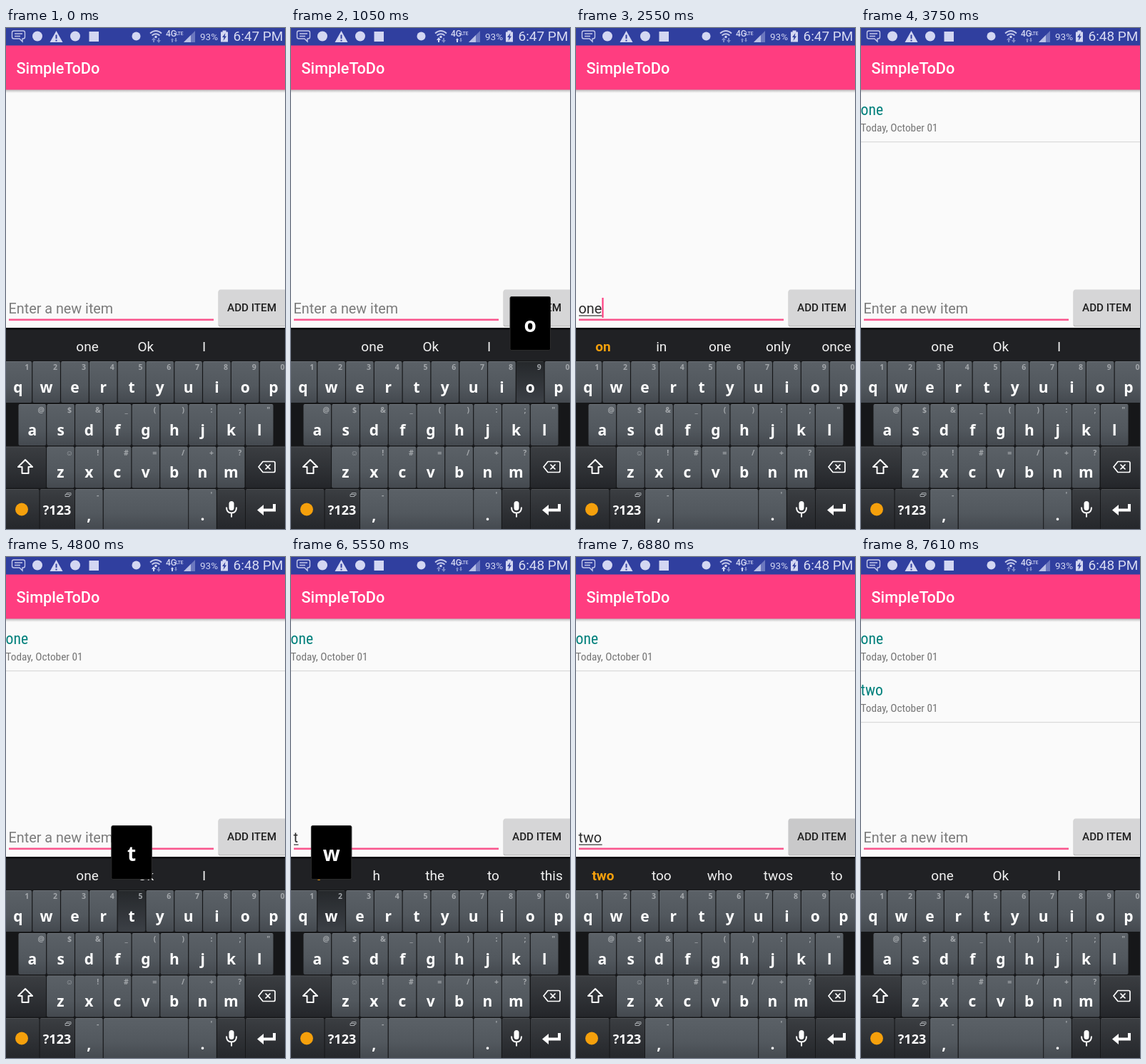
Animation of 391x702 px, one loop 8000 ms. Source, as an HTML page:

```html
<!DOCTYPE html>
<html lang="en">
<head>
<meta charset="utf-8">
<title>To-do list</title>
<style>
  html, body { margin: 0; width: 100%; height: 100%; overflow: hidden; background: #fafafa; }
  svg { display: block; width: 100%; height: 100%; font-family: Roboto, sans-serif; }
  .key { font: 700 21px "Noto Sans", sans-serif; fill: #fff; text-anchor: middle; }
  .tip { font: 700 10.5px "Noto Sans", sans-serif; fill: #a3a7ab; text-anchor: middle; }
  .word { font-size: 19px; fill: #f2f2f2; text-anchor: middle; }
  .word.top { font-weight: 700; fill: #f5a00c; }
  .condensed { font-family: "Roboto Condensed", Roboto, sans-serif; font-stretch: 75%; }
</style>
</head>
<body>
<svg id="stage" viewBox="0 0 391 702" preserveAspectRatio="none">
  <defs>
    <linearGradient id="light" x2="0" y2="1">
      <stop offset="0" stop-color="#5b6167"/><stop offset=".6" stop-color="#52585e"/><stop offset="1" stop-color="#44494f"/>
    </linearGradient>
    <linearGradient id="dark" x2="0" y2="1">
      <stop offset="0" stop-color="#3b3e42"/><stop offset="1" stop-color="#24262a"/>
    </linearGradient>
    <linearGradient id="down" x2="0" y2="1">
      <stop offset="0" stop-color="#25282b"/><stop offset="1" stop-color="#3c4046"/>
    </linearGradient>
    <linearGradient id="shade" x2="0" y2="1">
      <stop offset="0" stop-color="#b5b5b5"/><stop offset="1" stop-color="#fafafa"/>
    </linearGradient>
  </defs>
  <rect width="391" height="702" fill="#fafafa"/>
  <rect y="86" width="391" height="5" fill="url(#shade)"/>
  <rect y="24" width="391" height="62.5" fill="#ff3d80"/>
  <text x="14.5" y="64" font-size="21.7" font-weight="500" fill="#fff">SimpleToDo</text>

  <g id="status">
    <rect width="391" height="24.5" fill="#303f9f"/>
    <g fill="none" stroke="#c3c8ea" stroke-width="1.4">
      <path d="M11 4h13q2.500 0 2.500 2.500v6q0 2.500-2.500 2.500h-1v4l-4-4h-8q-2.500 0-2.500-2.500v-6q0-2.500 2.500-2.500zM12 8h11M12 11.500h8"/>
      <path d="M202 7.500q8-7 16 0M204.500 10.500q5.500-4.500 11 0" stroke-width="1.8"/>
    </g>
    <g fill="#d3d7f2">
      <circle cx="44" cy="11.500" r="7"/>
      <path fill-rule="evenodd" d="M70.500 4l9 16h-18zM69.500 9.500v5.500h2v-5.500zM69.500 16.500v2h2v-2z"/>
      <circle cx="97" cy="11.500" r="7"/>
      <rect x="116.500" y="5" width="13.500" height="14"/>
      <circle cx="182.500" cy="11.500" r="6"/>
      <circle cx="210" cy="12.500" r="1.700"/>
      <text x="224" y="12" font-size="12" font-weight="500">4G</text>
      <text x="238" y="9.500" font-size="6.500" font-weight="500">LTE</text>
      <text x="272" y="17" font-size="13.500">93%</text>
      <path fill-rule="evenodd" d="M303.500 3.500h5v2h2.500v14h-10v-14h2.500zM307.500 7l-4.500 6h2.500l-1 5 4.500-6.500h-2.500z"/>
    </g>
    <path d="M206 20v-3h-2l3-4 3 4h-2v3zM232 20v-3h-1l2-3 2 3h-1v3z" fill="#7d88c8" id="upload"/>
    <path d="M213 14v3h-2l3 4 3-4h-2v-3zM237 14v3h-1l2 3 2-3h-1v-3z" fill="#7d88c8"/>
    <path d="M249 20L265 4v16z" fill="#6c78bf"/>
    <path d="M249 20l10-10v10z" fill="#b9c0e6"/>
    <text id="clock" x="318.500" y="18" font-size="19" fill="#d8dbf2"></text>
  </g>

  <g id="list"></g>

  <text id="hint" x="3.500" y="400" font-size="19.800" fill="#7b7b7b">Enter a new item</text>
  <text id="entry" x="3.500" y="400" font-size="19.800" fill="#2b2b2b"></text>
  <rect id="rule" x="4" y="402.500" height="1.200" fill="#333"/>
  <rect id="caret" y="378" width="2.200" height="28" fill="#ff4081"/>
  <rect x="4" y="407.500" width="287" height="2.600" fill="#f9568d"/>

  <rect x="297.500" y="367.500" width="95" height="51" rx="2.500" fill="#bdbdbd"/>
  <rect x="298" y="366.500" width="95" height="50.500" rx="2.500" fill="#d6d6d7"/>
  <rect id="ripple" x="298" y="366.500" width="95" height="50.500" rx="2.500" fill="#000"/>
  <text x="344.500" y="397" font-size="15.200" font-weight="500" fill="#1f1f1f" text-anchor="middle">ADD ITEM</text>

  <rect y="420" width="391" height="282" fill="#161719"/>
  <rect y="420" width="391" height="46" fill="#202124"/>
  <rect y="420" width="391" height="3" fill="#101113"/>
  <g id="words"></g>
  <g id="keys"></g>
  <g id="icons" fill="none" stroke="#fff" stroke-width="2" stroke-linejoin="round">
    <path d="M27 605l10 10h-5.500v9h-9v-9h-5.500z"/>
    <path d="M360 607.500h15q2 0 2 2v11q0 2-2 2h-15l-6-7.500zM363.500 611.500l7 7m0-7l-7 7" stroke-width="1.700"/>
    <circle cx="22" cy="674.500" r="9" fill="#f5a00c" stroke="none"/>
    <path d="M83 653.500h6v3h-6zM85 653.500v-2h6v3h-2" stroke="#a3a7ab" stroke-width="1"/>
    <rect x="312.500" y="663" width="7" height="13" rx="3.500" fill="#fff" stroke="none"/>
    <path d="M309 671.500q0 8 7 8t7-8M316 679.500v6"/>
    <path d="M376 667v8.500h-18" stroke-width="4" stroke-linejoin="miter"/>
    <path d="M352 675.500l9-7.500v15z" fill="#fff" stroke="none"/>
  </g>
  <g id="popup">
    <rect width="56.500" height="75" rx="2" fill="#000" stroke="#2c2c2c"/>
    <text x="28.250" y="49" class="key" style="font-size:28px"></text>
  </g>
</svg>
<script>
const $ = id => document.getElementById(id);

function add(parent, tag, attrs, text = '') {
  const el = document.createElementNS('http://www.w3.org/2000/svg', tag);
  for (const name in attrs) el.setAttribute(name, attrs[name]);
  el.textContent = text;
  return parent.appendChild(el);
}

// Keyboard
const PITCH = 39.8;
const keys = {};

function addCap(x, y, width, height, fill) {
  const cap = add($('keys'), 'rect', { x, y, width, height, rx: 2, fill: `url(#${fill})` });
  add($('keys'), 'rect', { x: x + 1, y, width: width - 2, height: 1, fill: '#fff', opacity: .1 });
  return cap;
}

function addKey(label, tip, center, y, height) {
  const cap = addCap(center - 19.3, y, 38.6, height, 'light');
  add($('keys'), 'text', { x: center, y: y + 43.5, class: 'key' }, label);
  add($('keys'), 'text', { x: center + 12.5, y: y + 12, class: 'tip' }, tip);
  keys[label] = { cap, center, y };
}

const rows = [
  ['qwertyuiop', '1234567890', 16.8, 467],
  ['asdfghjkl', '@$&_():;"', 36.8, 527],
  ['zxcvbnm', '☺!#=/+?', 76.4, 586.5],
];
for (const [letters, tips, first, y] of rows)
  [...letters].forEach((letter, i) => addKey(letter, [...tips][i], first + i * PITCH, y, 58));

addKey(',', '-', 116.3, 646, 57);
addKey('.', "'", 275.5, 646, 57);
addCap(136.8, 646, 118.4, 57, 'light');
for (const [x, y, width] of [[-2, 586.5, 58], [336, 586.5, 57], [-2, 646, 48.5], [47.6, 646, 48.4], [296, 646, 39], [336, 646, 57]])
  addCap(x, y, width, 58, 'dark');
add($('keys'), 'text', { x: 71.5, y: 682, class: 'key', style: 'font-size:18px' }, '?123');

// List rows
const items = ['one', 'two'].map((name, i) => {
  const row = add($('list'), 'g', { transform: `translate(0 ${i * 72})`, class: 'condensed' });
  add(row, 'text', { x: -.5, y: 122, 'font-size': 21.7, fill: '#00807c' }, name);
  add(row, 'text', { x: -.5, y: 145, 'font-size': 15.3, fill: '#757575' }, 'Today, October 01');
  add(row, 'rect', { y: 159, width: 391, height: 1.2, fill: '#d9d9d9' });
  return row;
});

// Each step changes only the listed parts of the state
const idle = 'one Ok I';
const steps = [
  [0, { text: '', caret: 0, key: '', words: idle, press: 0, items: 0, clock: '6:47 PM', upload: 0 }],
  [150, { caret: 1, upload: 1 }],
  [750, { caret: 0 }],
  [1050, { key: 'o' }],
  [1200, { key: '', text: 'o', caret: 1 }],
  [1350, { words: 'o I Ok one ok', upload: 0 }],
  [1650, { key: 'n', caret: 0 }],
  [1800, { key: '', text: 'on', caret: 1 }],
  [1950, { words: 'on in one only once' }],
  [2250, { caret: 0 }],
  [2400, { key: 'e' }],
  [2550, { key: '', text: 'one', caret: 1 }],
  [2700, { words: 'one ones once money gone' }],
  [3000, { caret: 0 }],
  [3150, { press: .06 }],
  [3300, { press: .14, clock: '6:48 PM' }],
  [3450, { press: .04, text: '', caret: 1, words: idle, items: 1 }],
  [3750, { press: 0, caret: 0 }],
  [4200, { caret: 1, upload: 1 }],
  [4800, { key: 't', caret: 0 }],
  [5100, { key: '', text: 't', caret: 1, words: 't h the to this', upload: 0 }],
  [5550, { key: 'w', caret: 0 }],
  [5690, { key: '', text: 'tw', caret: 1 }],
  [5840, { words: 'tw re two Chirrel tre' }],
  [6280, { key: 'o', caret: 0 }],
  [6430, { key: '', text: 'two', caret: 1 }],
  [6580, { words: 'two too who twos to', upload: 1 }],
  [6880, { caret: 0, press: .06 }],
  [7020, { press: .14 }],
  [7170, { press: .04, text: '', caret: 1, words: idle, items: 2, upload: 0 }],
  [7610, { press: 0, caret: 0 }],
];
const LOOP = 8000;

const show = (el, on) => el.setAttribute('visibility', on ? 'visible' : 'hidden');

function drawWords(list) {
  $('words').textContent = '';
  const first = list === idle ? 114 : 38;
  list.split(' ').forEach((word, i) => add($('words'), 'text', {
    x: first + i * 81.8, y: 453, class: list !== idle && i === 0 ? 'word top' : 'word',
  }, word));
}

function drawPress(letter) {
  for (const name in keys) keys[name].cap.setAttribute('fill', `url(#${name === letter ? 'down' : 'light'})`);
  show($('popup'), letter);
  if (!letter) return;
  const { center, y } = keys[letter];
  $('popup').setAttribute('transform', `translate(${center - 28.2} ${y - 90.5})`);
  $('popup').lastElementChild.textContent = letter;
}

function draw(state) {
  $('clock').textContent = state.clock;
  $('upload').setAttribute('fill', state.upload ? '#d3d7f2' : '#7d88c8');
  items.forEach((row, i) => show(row, i < state.items));
  show($('hint'), !state.text);
  $('entry').textContent = state.text;
  const width = state.text ? $('entry').getComputedTextLength() : 0;
  $('rule').setAttribute('width', width);
  $('caret').setAttribute('x', 3.7 + width);
  show($('caret'), state.caret);
  $('ripple').setAttribute('opacity', state.press);
  drawWords(state.words);
  drawPress(state.key);
}

let shown = -1;
function tick() {
  const time = performance.now() % LOOP;
  const current = steps.filter(([start]) => start <= time).length;
  if (current !== shown) {
    draw(Object.assign({}, ...steps.slice(0, current).map(step => step[1])));
    shown = current;
  }
  requestAnimationFrame(tick);
}
tick();
</script>
</body>
</html>
```
